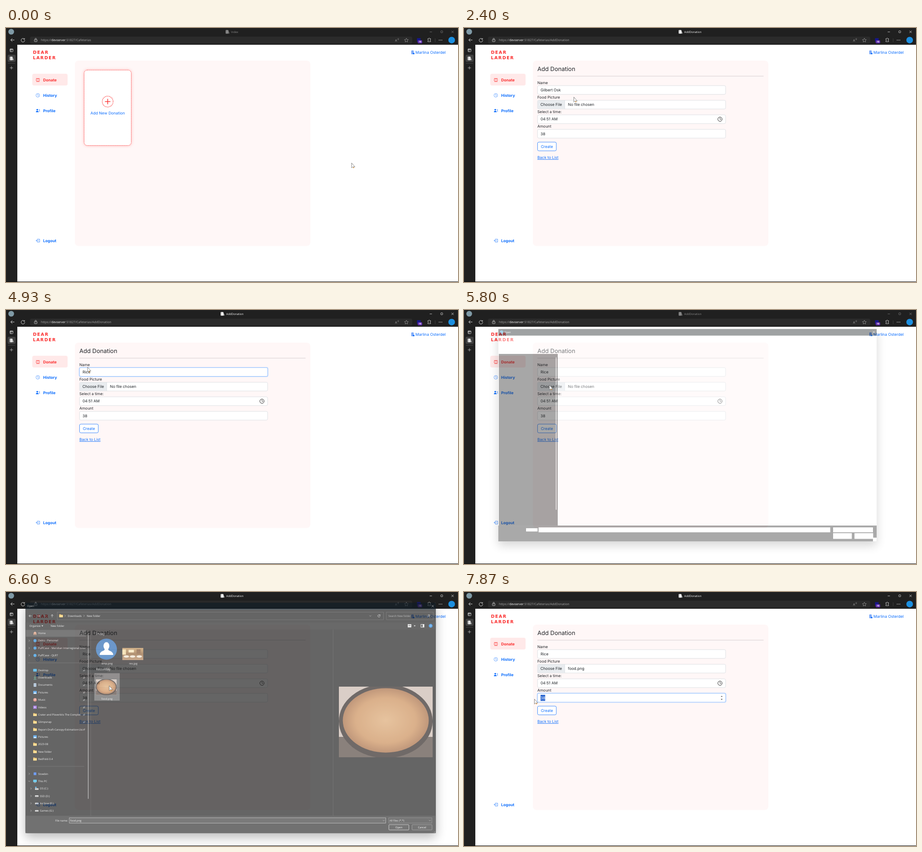
An HTML page that plays this animation: 998 px wide and 561 px high, repeating every 8 s.

```html
<!DOCTYPE html>
<html lang="en">
<head>
<meta charset="utf-8">
<title>Add donation</title>
<style>
html, body { margin: 0; width: 100%; height: 100%; overflow: hidden; background: #202020; }
svg { display: block; }
#stage { width: 100vw; height: 100vh; text-rendering: geometricPrecision; }
.page { font-family: Inter, sans-serif; }
.sys { font-family: "Open Sans", "Noto Sans", sans-serif; }
.brand { font: bold 9.6px "DejaVu Sans", sans-serif; letter-spacing: 1.4px; }
.mid { text-anchor: middle; }
.glow { filter: drop-shadow(0 0 3px #ff303055); }
.lift { filter: drop-shadow(0 10px 12px #00000066); }
</style>
</head>
<body>
<svg id="stage" viewBox="0 0 998 561"></svg>
<script>
const BLUE = '#0d6efd', RED = '#fb3030', INK = '#212529', LIGHT = '#e8e8e8';

const R = (x, y, w, h, fill, o = '') => `<rect x="${x}" y="${y}" width="${w}" height="${h}" fill="${fill}" ${o}/>`;
const C = (x, y, r, fill, o = '') => `<circle cx="${x}" cy="${y}" r="${r}" fill="${fill}" ${o}/>`;
const P = (d, stroke, w = 1, o = '') => `<path d="${d}" fill="none" stroke="${stroke}" stroke-width="${w}" ${o}/>`;
const F = (d, fill) => `<path d="${d}" fill="${fill}"/>`;
const T = (x, y, s, size, fill, o = '') => `<text x="${x}" y="${y}" font-size="${size}" fill="${fill}" ${o}>${s}</text>`;
const G = (id, body, o = '') => `<g id="${id}" ${o}>${body}</g>`;
const line = (color, w = 0.7) => `stroke="${color}" stroke-width="${w}"`;
const chev = (x, y, down, c = '#bbb') => P(down ? `M${x - 2} ${y - 1}l2 2 2-2` : `M${x - 1} ${y - 2}l2 2-2 2`, c, 0.7);
const sheet = (x, y) => R(x, y, 6, 8, 'currentColor', 'rx="1"') + P(`M${x + 2} ${y}v8`, '#666', 0.6) +
  F(`M${x + 6.4} ${y + 1}l1.8 6.6-1.6.4z`, 'currentColor');

// Browser frame
function browser() {
  return R(0, 0, 998, 561, '#202020') + R(0, 560, 998, 1, '#0a0a0a') +
    C(11.5, 8.3, 6.3, '#7f9aa6') +
    G('caption', sheet(485, 4.5) + sheet(474, 4.5).replace('<rect', '<rect class="alt"') +
      T(497, 11, 'Index', 6.15, 'currentColor', 'id="tab"') +
      P('M935.5 8.7h5M983.5 6l5 5m0-5l-5 5', 'currentColor', 0.7) +
      R(960, 6.3, 4.2, 4.2, 'none', `rx="1" ${line('currentColor')}`)) +
    P('M18.5 26.5h-8m3.6-3.6l-3.6 3.6 3.6 3.6', LIGHT, 0.9) +
    P('M40.6 24.6a4 4 0 1 0 .8 2.2M41 22.6v2.4h-2.4', LIGHT, 0.9) +
    R(53, 19, 844, 15.5, '#2b2b2b', 'rx="4"') +
    R(62.6, 25.5, 6, 4.6, 'none', `rx="1" ${line('#ddd', 0.8)}`) +
    P('M64 25.5v-1.2a1.6 1.6 0 0 1 3.2 0v1.2', '#ddd', 0.8) + C(65.6, 27.8, 0.6, '#ddd') +
    `<text x="77" y="29" font-size="6.85" fill="#a8a8a8">https://<tspan fill="#fff">devserver</tspan>:51827/Cafeterias<tspan id="path"></tspan></text>` +
    T(859, 29.5, 'A', 7, '#aaa') + P('M864.6 23.5q1.2 1 0 2.4m1.4-3.4q2 2 0 4.2', '#aaa', 0.6) +
    P('M884 22.6l1.3 2.8 3 .4-2.2 2.1.6 3-2.7-1.5-2.7 1.5.6-3-2.2-2.1 3-.4z', '#aaa', 0.7) +
    R(907.5, 22.5, 8, 8, '#16168a') + R(909, 27, 10, 7, '#5b2aa8', 'rx="2"') +
    T(914, 32.4, '18', 5, '#fff', 'class="mid" font-weight="bold"') +
    P('M931.4 23.6h1.8a1.3 1.3 0 0 1 2.6 0h1.8v2a1.3 1.3 0 0 0 0 2.6v2h-6.2v-2a1.3 1.3 0 0 0 0-2.6z', LIGHT, 0.8) +
    P('M947.5 23v8', '#555', 0.6) + [956.4, 959.4, 962.4].map(x => C(x, 26.7, 0.8, LIGHT)).join('') +
    C(984, 26.7, 7.3, '#1c8fe0') +
    R(8.8, 46, 6.6, 6.4, 'none', `rx="1" ${line(LIGHT, 0.8)}`) + P('M8.8 47.7h6.6M11 46v6.4', LIGHT, 0.9) +
    R(3.5, 59, 17.5, 16, '#404040', 'rx="3"') + G('side', sheet(8.3, 63.2), 'color="#eee"') +
    P('M4 78h16', '#666', 0.6) + P('M12 84.5v7m-3.5-3.5h7', '#ccc', 0.8);
}

// Web page shared parts
function shell() {
  const nav = (y, s, c) => T(82, y, s, 8.55, c, 'font-weight="700"');
  return R(25, 37, 973, 523, '#fff') +
    `<text class="brand" fill="${RED}"><tspan x="59.5" y="56.6">DEAR</tspan><tspan x="59.5" y="69">LARDER</tspan></text>` +
    R(895, 49.8, 5, 8, '#5a93f5', 'rx=".6"') + P('M896 51.8h3m-3 2h3m-3 2h2', '#fff', 0.6) + C(900.2, 56.5, 1.8, BLUE) +
    T(904, 57.2, 'Marlina Osterdel', 8.6, BLUE) +
    R(58, 101, 78, 26, '#ffe9e9', 'rx="4"') +
    P('M66.3 111.4h8M67 118.4h7', RED, 0.8) + R(66.6, 113, 7.4, 3.8, 'none', `rx=".6" ${line(RED)}`) +
    nav(118, 'Donate', RED) +
    C(70.2, 148.7, 4, 'none', line(BLUE, 0.6)) + P('M70.2 146v3l2 1', BLUE, 0.6) + nav(151.8, 'History', BLUE) +
    C(69, 180.5, 1.8, BLUE) + F('M66 186q0-3 3-3t3 3z', BLUE) + P('M72.3 180.5h2.6m-2 2h2m-1.6 2h1.6', BLUE, 0.8) +
    nav(185.6, 'Profile', BLUE) +
    P('M69 468v-1.6h5.3v6.4H69v-1.6M72.4 469.6H66.4m1.8-1.8l-1.8 1.8 1.8 1.8', BLUE, 0.7) + nav(472.8, 'Logout', BLUE) +
    R(152, 72, 520, 409.5, '#fff7f7', 'rx="8"');
}

function home() {
  return R(172.5, 93, 104, 166.5, '#fff', `rx="7" class="glow" ${line(RED, 1)} stroke-dasharray="1.3 1.2"`) +
    C(224.5, 162.5, 12, '#fff', `${line(RED, 1.5)} stroke-dasharray="1.5 1.64"`) +
    P('M224.5 156.5v12m-6-6h12', RED, 1.5) +
    T(224.5, 191.2, 'Add New Donation', 8.6, BLUE, 'class="mid"');
}

const ROWS = { name: 127.3, file: 159.6, time: 191.8, amount: 223.9 };

function form() {
  const field = (id, label, extra = '') => {
    const y = ROWS[id];
    return T(162, y - 3.5, label, 8.4, INK) +
      R(160.8, y - 1.4, 418.4, 22, '#c2dbfe', `rx="4" id="${id}Ring"`) +
      R(162.3, y, 415.4, 19.3, '#fff', `rx="3" id="${id}Box" ${line('#ced4da')}`) + extra +
      T(id === 'file' ? 229.5 : 169, y + 12.6, '', 8.5, INK, `id="${id}"`);
  };
  return T(162, 94.5, 'Add Donation', 13, INK) + P('M162 106.3h499.5', '#cbc6c7', 0.8) +
    field('name', 'Name') +
    field('file', 'Food Picture', F('M165 160h57.5v18.6H165q-2.3 0-2.3-2.3v-14q0-2.3 2.3-2.3z', '#e9ecef') +
      P('M222.5 160v18.6', '#ced4da', 0.6) + T(168.8, 172.2, 'Choose File', 8.5, INK)) +
    field('time', 'Select a time:', C(565.2, 201.4, 4.7, 'none', line('#222', 1)) + P('M565.2 198.4v3.2h2.6', '#222', 0.9)) +
    field('amount', 'Amount', G('spin', F('M567 231.6l2-2.4 2 2.4z', '#555') + F('M567 236l2 2.4 2-2.4z', '#555'))) +
    R(162.4, 252, 41.4, 19.3, '#fff', `rx="3" ${line(BLUE, 0.8)}`) + T(183, 264.6, 'Create', 8.5, BLUE, 'class="mid"') +
    T(162, 289, 'Back to List', 8.5, BLUE, 'text-decoration="underline"') +
    `<clipPath id="cut"><rect id="cutBox" y="120" height="140"/></clipPath><g clip-path="url(#cut)">` +
    R(169, 0, 0, 13.4, '#2b66cf', 'id="mark"') + T(169, 0, '', 8.5, '#fff', 'id="marked"') + '</g>';
}

// File dialog
const ICON = {
  house: (x, y) => F(`M${x - 4} ${y}l4-4 4 4h-1.2v4h-5.6v-4z`, '#e8a07a') + R(x - 1, y + 1, 2, 3, '#5a3a2a'),
  blob: (x, y) => C(x, y, 3.4, '#1f8fe0'),
  box: (x, y) => R(x - 3, y - 3, 6, 6, '#2a6df0'),
  desk: (x, y) => R(x - 4, y - 3, 8, 6, '#27a6e6', 'rx="1"'),
  down: (x, y) => P(`M${x} ${y - 4}v6m-2.4-2.4l2.4 2.4 2.4-2.4M${x - 3} ${y + 4}h6`, '#3fc193', 0.9),
  doc: (x, y) => R(x - 3, y - 4, 6, 8, '#a9c3dd', 'rx=".6"') + P(`M${x - 1.6} ${y - 1}h3.2m-3.2 2h3.2`, '#35597c', 0.7),
  pic: (x, y) => R(x - 4, y - 3.3, 8, 6.6, '#2a8ee8', 'rx="1"') + F(`M${x - 3.4} ${y + 3}l3.4-3.6 3.4 3.6z`, '#eaf5ff'),
  tune: (x, y) => C(x, y, 3.9, '#d9705c') + P(`M${x} ${y + 1.5}v-3.6l1.8 1`, '#fff', 0.9),
  film: (x, y) => R(x - 4, y - 3.6, 8, 7.2, '#8148d4', 'rx="1"') + F(`M${x - 1.2} ${y - 1.8}l3 1.8-3 1.8z`, '#fff'),
  dir: (x, y) => F(`M${x - 4} ${y - 3.4}h3l1 1.2h4v5.6h-8z`, '#dfa02c') + R(x - 4, y - 1.4, 8, 4.8, '#fbcf62', 'rx=".6"'),
  pc: (x, y) => R(x - 4, y - 3.4, 8, 5.6, '#2fb4e4', 'rx=".8"') + R(x - 2, y + 2.8, 4, 1, '#aaa'),
  disk: (x, y) => R(x - 4, y - 1.4, 8, 3.4, '#ddd', 'rx="1"') + R(x - 3, y + 0.4, 6, 0.7, '#666'),
  sys: (x, y) => R(x - 3.6, y - 4, 3, 3, '#29a3ee') + ICON.disk(x, y + 0.8)
};

// slot: icon, label, chevron (r = right, d = down)
const TREE = [
  'house|Home', 'blob|Delro - Personal|r', 'blob|PuffCase - Meridian Interregional Univ|r', 'blob|PuffCase - QLRT|r', '',
  'desk|Desktop', 'down|Downloads', 'doc|Documents', 'pic|Pictures', 'tune|Music', 'film|Videos',
  'dir|Crater and Ploverkits The Complet', 'dir|Glimpsnap', 'dir|Report-Draft-Canopy-Estimation-Usi',
  'pic|Pictures', 'dir|2023-08', 'dir|New folder', 'dir|RedFold-3.4', '',
  'box|Stowbin|r', 'pc|This PC|d', 'sys|OS (C:)|r', 'disk|SSD (D:)|r', 'disk|Archive (E:)|r', 'disk|Games (G:)|r'
];

function treeRow(item, i) {
  const y = 88.4 + 16.6 * i;
  if (!item) return P(`M41 ${y}h127`, '#484848', 0.7);
  const [icon, label, arrow] = item.split('|');
  const dx = i > 20 ? 4 : 0, pinned = i > 4 && i < 14;
  return ICON[icon](57.5 + dx, y) + (arrow ? chev(44.5 + dx, y, arrow === 'd') : '') +
    `<svg x="${64.5 + dx}" y="${y - 6}" width="${(pinned ? 99.5 : 107.5) - dx}" height="12">${T(0, 8.1, label, 6, LIGHT)}</svg>` +
    (pinned ? P(`M165.4 ${y + 2.6}l1.8-1.8m-1.4-1.2l2.6 2.6m-2-2l2.2-1.8 1 1-1.8 2.2`, '#bbb', 0.8) : '');
}

const food = (x, y, w, h) => `<svg x="${x}" y="${y}" width="${w}" height="${h}" viewBox="0 0 60 45" preserveAspectRatio="none">` +
  R(0, 0, 60, 45, '#c9b7ac') + R(0, 32, 60, 13, '#51433c') +
  '<ellipse cx="30" cy="22" rx="30" ry="23.5" fill="#2a211d"/><ellipse cx="30" cy="21.5" rx="27.5" ry="20.5" fill="url(#rice)"/></svg>';

const room = (x, y) => R(x, y, 47, 27, 'url(#warm)') + R(x, y + 3, 8, 12, '#f4d79a') + R(x + 14, y + 4, 12, 6, '#f8e3b4') +
  R(x + 32, y + 3, 9, 10, '#7a4a26') + [4, 18, 33].map(d => `<ellipse cx="${x + d + 5}" cy="${y + 19}" rx="6" ry="2.6" fill="#efe2cf"/>`).join('');

function files() {
  const btn = (x, s, c) => R(x, 518, 45, 12, '#333', `rx="1.5" ${line(c, 0.8)}`) + T(x + 22.5, 526.2, s, 6, '#fff', 'class="mid"');
  return R(36, 20, 921, 15.5, '#0f1b24', 'rx="4"') + R(36, 64, 921, 16, '#1f1f1f') +
    C(44, 27.4, 4, '#2a93c8', 'id="logo"') + T(51, 29.5, 'Open', 6, '#fff', 'id="head"') +
    P('M947.5 25l5 5m0-5l-5 5', '#fff', 0.8) +
    P('M50 49.5h-6m2.6-2.6L44 49.5l2.6 2.6M62 49.5h6m-2.6-2.6l2.6 2.6-2.6 2.6M96 52.5v-6m-2.6 2.6l2.6-2.6 2.6 2.6', LIGHT, 0.8) +
    chev(81, 49.5, true) + R(107.5, 41, 732, 17, '#191919', line('#4d4d4d')) + ICON.dir(116, 49) +
    chev(125, 49.3) + T(131, 51.4, 'Downloads', 6, LIGHT) + chev(167.5, 49.3) + T(173.5, 51.4, 'New folder', 6, LIGHT) +
    chev(810, 49.5, true) + P('M831.6 48a2.6 2.6 0 1 0 .4 2M832 46.4v2h-2', LIGHT, 0.8) +
    R(846, 41, 105, 17, '#191919', line('#4d4d4d')) + T(850.5, 51.4, 'Search New folder', 5.9, '#a0a0a0') +
    C(941.5, 48.5, 1.9, 'none', line(LIGHT)) + P('M940 50l-2.2 2.4', LIGHT, 0.8) +
    T(45, 73.8, 'Organize', 6, LIGHT) + F('M72 70.8h4l-2 2.4z', LIGHT) + T(92.5, 73.8, 'New folder', 6, LIGHT) +
    R(894.5, 68.5, 7, 6.4, '#ddd', line('#fff')) + R(895.6, 70, 4.8, 2, '#777') + F('M907.5 70.8h4l-2 2.4z', LIGHT) +
    R(923.5, 68.5, 7, 6.4, 'none', line('#fff', 0.9)) + R(927.5, 68.5, 3, 6.4, '#fff') +
    C(945.3, 71.7, 4.2, '#1a82e2') + T(945.3, 73.9, '?', 6, '#fff', 'class="mid"') +
    R(37, 80.8, 135, 15.4, '#393939') + TREE.map(treeRow).join('') +
    R(176.3, 89, 1.3, 371, '#a8a8a8') + P('M182.5 80v418M726.5 80v418', '#333', 0.8) +
    R(184, 163, 542, 14, '#4b4b4b', 'id="band"') + R(190.6, 178, 57, 61.6, '#5c5c5c', 'id="tile"') +
    G('folds', chev(189, 90, true) + chev(189, 169.5, true)) +
    T(194, 92.5, 'Today', 7.3, LIGHT) + T(194, 172, 'Yesterday', 7.3, LIGHT) +
    C(217.8, 124.2, 23.6, '#2368b5') + '<ellipse cx="217.8" cy="117" rx="6.6" ry="8.6" fill="#fff"/>' +
    F('M202.5 137q.5-7 9-9.5 2.5-1 2.6-4h7.4q.1 3 2.6 4 8.5 2.500 9 9.500z', '#fff') +
    room(253.5, 121.5) + food(194, 191.8, 47, 35.4) +
    T(219.3, 158, 'emp.png', 6, LIGHT, 'class="mid"') + T(278, 158, 'res.jpg', 6, LIGHT, 'class="mid"') +
    T(219, 237.6, 'food.png', 6, LIGHT, 'class="mid"') +
    T(842, 290.8, 'Select a file to preview.', 5.9, LIGHT, 'class="mid" id="hint"') + G('preview', food(739.4, 208.2, 210.4, 158.6)) +
    R(36, 498, 921, 39, '#2b2b2b') + T(131.5, 510.6, 'File name:', 6, LIGHT, 'text-anchor="end"') +
    R(134.5, 502.7, 710, 12, '#383838', line('#b5b5b5', 0.8)) + chev(840, 508.7, true) +
    P('M136.8 505v7.500', '#eee', 0.6, 'id="caret"') + T(136.5, 510.7, '', 6, '#fff', 'id="picked"') +
    R(851, 502.7, 97, 12, '#333', line('#777')) + T(853, 510.6, 'All files (*.*)', 6, LIGHT) + chev(943.500, 508.7, true) +
    btn(851.500, 'Open', '#ddd') + btn(903.5, 'Cancel', '#8a8a8a') + P('M955.5 533l-3 3m3-1l-1 1', '#aaa', 0.7);
}

function blank() {
  const dark = '#262626';
  return R(36, 20, 921, 16, '#12191c') + C(44, 27.4, 4, '#2a93c8') + T(51, 29.5, 'Open', 6, '#fff') +
    P('M947.5 25l5 5m0-5l-5 5', '#fff', 0.8) +
    R(37.3, 80.6, 143.3, 418, dark) + R(176, 89, 1.5, 371, '#fff') + R(36, 498.5, 921, 38.5, '#2b2b2b') +
    [[103.5, 505, 28, 8], [134, 503, 710, 12], [851, 503, 97, 12], [851, 517, 45.5, 14], [903, 517, 45.5, 14], [948, 528, 9, 9]]
      .map(b => R(...b, '#fff')).join('');
}

const DEFS = `<defs>
<radialGradient id="rice"><stop offset="0" stop-color="#dba66f"/><stop offset=".7" stop-color="#c98a52"/><stop offset="1" stop-color="#a2653a"/></radialGradient>
<linearGradient id="warm" x2="0" y2="1"><stop offset="0" stop-color="#c89a5a"/><stop offset=".5" stop-color="#8a5a2e"/><stop offset="1" stop-color="#b98a5e"/></linearGradient>
</defs>`;

document.getElementById('stage').innerHTML = DEFS +
  G('frame', browser(), 'class="sys"') +
  G('site', shell() + G('home', home()) + G('form', form()), 'class="page"') +
  G('dialog', R(36, 20, 921, 517, '#191919', 'rx="4" class="lift" id="body"') + G('blank', blank()) + G('files', files()), 'class="sys"') +
  G('arrow', `<path d="M0 0V11L2.700 8.700H7.500Z" fill="#fff" stroke="#666" stroke-width=".8" stroke-linejoin="round"/>` + C(4.4, 10.3, 1.3, '#d99a4a')) +
  G('beam', P('M-1.500-5h3M0-5V5M-1.500 5h3', '#333', 0.8));

const el = {};
document.querySelectorAll('[id]').forEach(n => { el[n.id] = n; });
const set = (id, attrs) => { for (const k in attrs) el[id].setAttribute(k, attrs[k]); };
const show = (id, on) => { el[id].style.display = on ? '' : 'none'; };
const write = (id, s) => { if (el[id].textContent !== s) el[id].textContent = s; };

// Pointer path: step, x, y
const PATH = [
  [0, 763, 298], [11, 217, 174], [22, 217, 174], [27, 242.5, 152.5], [36, 242.5, 152.5], [43, 212, 165], [45, 212, 165],
  [48, 209, 137], [52, 145, 137], [73, 145, 137], [74, 180, 126], [84, 188.5, 165.5], [88, 188.5, 165.5],
  [93, 216.5, 171], [96, 228, 207], [100, 228, 207], [111, 182, 235], [112, 182, 235], [116, 158, 240], [117, 158, 240],
  [118, 155.5, 236.5], [120, 155.5, 236.5]
];
// Dialog: step, scale, opacity
const ZOOM = [[87, 0.907, 0.4], [88, 0.965, 0.8], [89, 0.99, 1], [90, 1, 1], [98, 1, 1], [99, 0.984, 0.665], [100, 0.955, 0.3], [101, 0.925, 0.08], [102, 0.91, 0]];

function sample(table, s, ease = u => u) {
  const i = Math.max(1, table.findIndex(k => k[0] >= s));
  const a = table[i - 1], b = table[i];
  const u = ease(Math.min(1, Math.max(0, (s - a[0]) / (b[0] - a[0]))));
  return a.slice(1).map((v, j) => v + (b[j + 1] - v) * u);
}

function render(s) {
  const within = (a, b) => s >= a && s < b;
  const added = s >= 14, filled = s >= 36;
  const ring = within(48, 83) ? 'name' : within(83, 86) || within(100, 113) ? 'file' : s >= 113 ? 'amount' : '';

  el.caption.style.color = within(11, 86) || s >= 99 ? '#fff' : '#8a8a8a';
  write('tab', added ? 'AddDonation' : 'Index');
  set('tab', { x: added ? 486.3 : 497 });
  write('path', added ? '/AddDonation' : '');
  const icons = el.caption.children;
  icons[0].style.display = icons[1].style.display = icons[2].style.display = added ? 'none' : '';
  icons[3].style.display = icons[4].style.display = icons[5].style.display = added ? '' : 'none';
  show('home', !added);
  show('form', added);

  const name = !filled ? '' : s < 61 ? 'Gilbert Osk' : 'Rice'.slice(0, s < 64 ? 1 : s < 66 ? 3 : 4);
  write('name', name);
  write('file', s >= 100 ? 'food.png' : 'No file chosen');
  write('time', filled ? '04:51 AM' : '--:-- --');
  write('amount', filled ? '38' : '');
  for (const id in ROWS) {
    show(id + 'Ring', id === ring);
    set(id + 'Box', { stroke: id === ring ? '#86b7fe' : '#ced4da' });
  }
  show('spin', s >= 111);

  // Text is selected from right to left
  const id = within(49, 61) ? 'name' : s >= 114 ? 'amount' : '';
  show('mark', id);
  show('marked', id);
  if (id) {
    const full = el[id].getComputedTextLength();
    const w = full * Math.min(1, id === 'name' ? (s - 48) / 3 : (s - 113) / 2);
    set('mark', { y: ROWS[id] + 3.2, width: full });
    set('cutBox', { x: 169 + full - w, width: w });
    set('marked', { y: ROWS[id] + 12.6 });
    write('marked', el[id].textContent);
  }

  show('dialog', within(87, 102));
  if (within(87, 102)) {
    const [k, alpha] = sample(ZOOM, s);
    const loaded = s >= 89, chosen = s >= 97, closing = s >= 99;
    set('dialog', { transform: `translate(464 257) scale(${k}) translate(-464 -257)`, opacity: alpha });
    set('body', { fill: loaded ? '#191919' : '#fff' });
    show('blank', !loaded);
    show('files', loaded);
    show('band', within(92, 95));
    show('tile', s >= 95);
    show('preview', chosen);
    show('hint', !chosen);
    show('caret', !chosen);
    show('logo', !closing);
    show('folds', !closing);
    set('head', { x: closing ? 40 : 51 });
    write('picked', chosen ? 'food.png' : '');
  }

  const [x, y] = sample(PATH, s, u => u * u * (3 - 2 * u));
  const beam = within(47, 74) || within(110, 118);
  show('beam', beam);
  show('arrow', !beam);
  set(beam ? 'beam' : 'arrow', { transform: `translate(${x} ${y})` });
}

const LOOP = 8000, RATE = 0.015;
let start, last = -1;
function tick(now) {
  start ??= now;
  const step = Math.floor(((now - start) % LOOP + 5) * RATE) % 120;
  if (step !== last) render(last = step);
  requestAnimationFrame(tick);
}
render(0);
requestAnimationFrame(tick);
</script>
</body>
</html>
```
